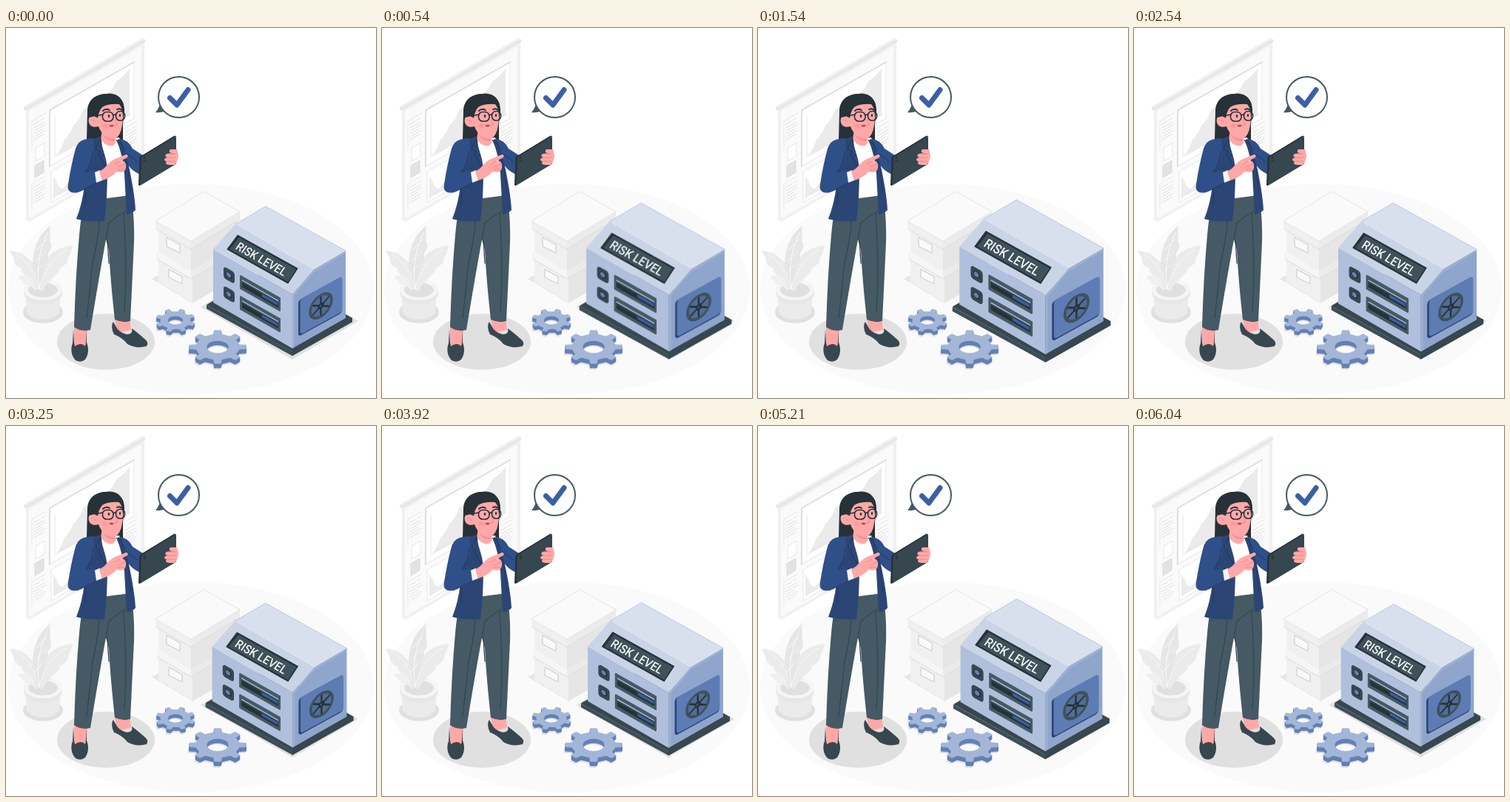
These frames come from a looping animation (500x500 px, 6.08 s). An HTML page:

```html
<!DOCTYPE html>
<html lang="en">
<head>
<meta charset="utf-8">
<title>Risk level</title>
<style>
  html, body { margin: 0; width: 100%; height: 100%; overflow: hidden; background: #fff; }
  svg { display: block; width: 100vw; height: 100vh; }
  #vault { transform-origin: 369.5px 342px; animation: pulse 6080ms linear infinite; }
  @keyframes pulse {
    0%, 60%, 100% { transform: scale(1); }
    20%, 80% { transform: scale(1.1); }
  }
  .label { font: 500 12.6px Roboto, Arial, sans-serif; fill: #f5f5f5; text-anchor: middle; }
  .line { fill: none; stroke-linecap: round; stroke-linejoin: round; }
  .skin { fill: #ffa8a7; }
  .dark { fill: #263238; }
  .shoe { fill: #37474f; }
  .jacket { fill: #2b4675; }
  .sleeve { fill: #2f4f88; }
  .fold { stroke: #22365f; stroke-width: 1; }
  .crease { stroke: #344750; stroke-width: 1.3; }
  .tint { stroke: #ea8583; stroke-width: .9; }
</style>
</head>
<body>
<svg viewBox="0 0 500 500">
  <defs>
    <g id="slot">
      <path fill="#455a64" stroke="#455a64" stroke-width="2" stroke-linejoin="round" d="M317 335L370 365V382L317 352Z"/>
      <path fill="#a3b4d5" d="M319 340L368 368V370L319 342Z"/>
      <path class="dark" d="M319 342L368 370V378L319 350Z"/>
      <path fill="#3a60a4" d="M346 359L367 371V375L346 363Z"/>
      <path fill="#37474f" d="M319 342L368 370V372L319 344Z"/>
    </g>
    <g id="knob">
      <rect x="-7.500" y="-8" width="15" height="16" rx="4" fill="#37474f"/>
      <circle r="4.200" fill="#263238"/>
      <circle cx="-.5" r="3" fill="#6180b6"/>
    </g>
    <g id="note" class="line" stroke="#e0e0e0" stroke-width="1">
      <path d="M0 4L19 -7M0 4V38" stroke="#e6e6e6"/>
      <path d="M3 8L10 4M13 2L17 0M3 13L16 5.5M3 17L18 8.5M3 21L14 14.5M3 25L18 16.5M3 29L16 21.5"/>
    </g>
  </defs>

  <ellipse cx="250" cy="353" rx="247" ry="142.500" fill="#fafafa"/>

  <g id="board">
    <path fill="#f0f0f0" d="M27 108L187 17V171L31 262L27 259Z"/>
    <path fill="#fafafa" d="M31 112L183 25V170L31 258Z"/>
    <path class="line" stroke="#e6e6e6" stroke-width="6" d="M27 108L185 17"/>
    <path class="line" stroke="#f0f0f0" stroke-width="3" d="M27 106L185 15"/>
    <path fill="#fff" stroke="#e6e6e6" d="M59 111L173 46V122L59 187Z"/>
    <path class="line" stroke="#dedede" stroke-width="2" d="M59 187V111L173 46"/>
    <path fill="#ebebeb" d="M68 173Q75 163 79 151Q86 145 91 132Q99 126 104 111L121 99Q142 91 149 72Q157 68 167 55V118Z"/>
    <path class="line" stroke="#e6e6e6" d="M66 120V174L168 116"/>
    <use href="#note" x="35" y="122"/>
    <use href="#note" x="35" y="207"/>
    <use href="#note" x="158" y="133"/>
    <path fill="#fff" stroke="#e6e6e6" d="M40 162L52 155V173L40 180Z"/>
    <path fill="#e3e3e3" stroke="#d9d9d9" d="M39 186L51 179V195L39 202Z"/>
    <path fill="#fff" stroke="#e6e6e6" d="M61 194L98 173V215L61 236Z"/>
    <path fill="#ebebeb" d="M64 230V201Q68 205 71 214Q77 221 82 211Q89 205 96 202V212Z"/>
  </g>

  <g id="plant">
    <ellipse cx="50" cy="384" rx="27" ry="15" fill="#e0e0e0"/>
    <path fill="#ebebeb" d="M26 357H74L72 385Q63 394 50 394Q36 394 28 385Z"/>
    <path fill="#e6e6e6" d="M24 353V360Q29 373 50 374Q71 373 76 360V353Z"/>
    <ellipse cx="50" cy="354" rx="26" ry="14" fill="#f5f5f5"/>
    <ellipse cx="50" cy="354" rx="20" ry="10" fill="#e0e0e0"/>
    <path fill="#ebebeb" d="M46 355C45 322 54 297 91 294C87 301 88 306 84 310C85 316 79 322 73 324C73 333 58 337 50 356Z"/>
    <path fill="#ebebeb" d="M44 353C46 332 38 304 5 301C8 307 11 311 11 316C13 322 18 324 21 325C20 331 28 336 35 339Z"/>
    <path fill="#e6e6e6" d="M42 353C32 324 33 288 60 267C58 275 61 281 59 288C64 295 59 302 56 306C60 313 54 319 51 324C54 331 48 340 47 354Z"/>
    <path fill="#f0f0f0" d="M41 353C38 338 29 331 16 336C19 340 23 342 24 347C30 346 37 350 40 356Z"/>
    <path class="line" stroke="#fafafa" d="M45 353Q38 312 56 277M45 353Q53 316 82 300M43 353Q39 320 13 305M40 316L54 301M39 333L49 320M41 300L55 286"/>
  </g>

  <g id="cartons">
    <path fill="#e6e6e6" d="M197 339L252 372L318 334L262 304Z"/>
    <path fill="#f0f0f0" d="M206 309L252 335V371L206 344Z"/>
    <path fill="#e6e6e6" d="M252 335L312 300V337L252 371Z"/>
    <path fill="#f5f5f5" d="M203 301L250 328V338L203 311Z"/>
    <path fill="#ebebeb" d="M250 328L316 290V300L250 338Z"/>
    <path fill="#f0f0f0" d="M206 269L250 295V328L206 302Z"/>
    <path fill="#e6e6e6" d="M250 295L312 259V293L250 328Z"/>
    <path fill="#f0f0f0" d="M202 261L250 288V298L202 271Z"/>
    <path fill="#ebebeb" d="M250 288L316 248V258L250 298Z"/>
    <path fill="#fafafa" stroke="#e6e6e6" stroke-linejoin="round" d="M202 261L267 221L316 248L250 288Z"/>
    <path class="line" stroke="#dedede" d="M203 272L250 299L316 259M204 312L250 339L280 322"/>
    <g fill="#fafafa" stroke="#c7c7c7" stroke-linejoin="round">
      <path d="M217 283L235 293V304L217 295Z"/>
      <path d="M220 326L238 336V346L220 337Z"/>
    </g>
  </g>

  <g id="gears"></g>

  <path fill="#e0e0e0" d="M263 377L387 448L476 396L354 326Z"/>

  <g id="vault">
    <g stroke-linejoin="round">
      <path fill="#37474f" stroke="#37474f" d="M272 374L387 437L467 392L352 328Z"/>
      <path fill="#3c4d56" stroke="#3c4d56" d="M271.500 375L387 438V442.500L271.500 379Z"/>
      <path fill="#37474f" stroke="#37474f" d="M387 437L467.500 392V397L387 442.500Z"/>
    </g>
    <path fill="#b0bfdb" d="M280 299L387 360V433L280 371Z"/>
    <path fill="#8fa5cc" d="M387 360L416 326L459 301V392L387 433Z"/>
    <path fill="#9db0d2" d="M387 360L416 326L459 301V304L416 330L390 361V431L387 433Z"/>
    <path fill="#c9d4e7" d="M280 299L310 265L416 326L387 360Z"/>
    <path fill="#d9e0ed" d="M310 265L351 241L459 301L416 326Z"/>
    <path class="line" stroke="#b0bfdb" stroke-width=".8" d="M310 265L351 241L459 301"/>

    <path fill="#263238" stroke="#263238" stroke-linejoin="round" d="M313 280L394 325L381 345L299 299Z"/>
    <path fill="#3f525b" d="M315 283L392 326L381 343L302 299Z"/>
    <text class="label" transform="matrix(1 .565 -.74 1.060 342 317)">RISK LEVEL</text>

    <use href="#knob" transform="matrix(1 .565 0 1 301.500 334)"/>
    <use href="#knob" transform="matrix(1 .565 0 1 301.500 360)"/>
    <use href="#slot"/>
    <use href="#slot" y="28"/>

    <g transform="matrix(1 -.55 0 1 425.500 375.500)">
      <rect x="-30.500" y="-24" width="59" height="49" rx="4" fill="#2b4675"/>
      <rect x="-28" y="-24.500" width="57" height="48" rx="4" fill="#5c7cb3"/>
      <circle r="15" fill="#526b98"/>
      <path class="line" stroke="#263238" stroke-width="2.200" d="M0 -14V14M-12 -7L12 7M-12 7L12 -7"/>
      <circle r="14.500" fill="none" stroke="#3f525b" stroke-width="3.500"/>
      <circle r="4" fill="#263238"/>
      <circle cx="-.5" r="1.500" fill="#455a64"/>
    </g>
  </g>

  <g id="bubble">
    <path fill="#455a64" d="M202 114Q206 110 208 102L215 112Q209 115 202 114Z"/>
    <circle cx="233.500" cy="93.500" r="27.500" fill="#fff" stroke="#455a64" stroke-width="2"/>
    <path class="line" stroke="#3a60a4" stroke-width="7" d="M221.500 94.500L231 104L246 83.500"/>
  </g>

  <g id="woman">
    <ellipse cx="135" cy="424" rx="66" ry="38" fill="#e0e0e0"/>
    <path class="dark" d="M109 152L110 113C110 95 124 88 138 89C152 89 160 98 160 112L158 130V152L126 160Z"/>

    <path class="skin" d="M92 402H110L109 434L92 432ZM146 390L167 391L169 408L151 412Z"/>
    <path class="shoe" d="M90 426C87 433 88 443 94 449Q101 453 107 448C112 441 112 432 109 425L109 408L108 425Q102 422 92 426L91 407Z"/>
    <path class="shoe" d="M145 397C142 401 143 408 146 414Q157 418 164 427Q176 434 190 430Q194 425 186 419Q177 411 170 406Q172 414 163 414Q152 411 149 404Z"/>
    <path class="skin" d="M92 425Q102 421 108 425L107 430Q102 424 93 430Z"/>
    <path fill="#455a64" d="M106 234L168 226Q174 250 173 290L168 396Q158 399 147 394Q141 340 139 300L135 286Q126 335 114 408Q101 411 92 404Q94 335 99 280Q101 255 106 234Z"/>
    <path class="line crease" d="M135 286L139 264Q153 252 163 247M126 245Q128 270 117 318L109 392M139 318L137 286M159 250Q164 320 160 384M108 238Q105 253 105 262"/>

    <path fill="#fff" d="M129 150L153 148Q164 185 162 225Q150 230 134 227Z"/>
    <path class="skin" d="M130 138L148 145L149 152Q147 161 139 159Q132 157 128 150Z"/>
    <path class="sleeve" d="M154 150Q165 151 171 163L185 172L181 198Q170 193 165 185Z"/>
    <path class="jacket" d="M149 151L156 151L165 182Q174 224 175 246Q170 251 163 252L160 197Q158 171 149 151Z"/>
    <path class="jacket" d="M128 147C128 160 136 173 137 191Q137 231 133 261Q113 263 95 258Q103 238 106 213L108 175L117 150Z"/>
    <path class="sleeve" d="M118 149C104 150 98 152 94 163Q88 185 84 211C82 221 88 224 98 222L123 209L121 193L108 195L120 172Z"/>
    <path class="line fold" d="M108 195Q116 181 118 166M128 149L121 164L127 167L125 171L137 191M152 150L160 164L157 168L163 183M108 220L107 239M164 183L169 225M101 220L121 210M163 170L178 181"/>
    <path fill="#f5f5f5" d="M120 195L127 192L130 206L122 209Z"/>
    <path class="skin" d="M126 194Q133 190 138 184Q143 178 150 176L162 171Q166 171 164 175L154 180Q160 178 162 184Q163 191 159 194Q155 196 150 194Q141 203 130 206Z"/>
    <path class="line tint" d="M154 180L147 184M161 184L151 188M159 191L151 191"/>

    <path fill="#263238" stroke="#263238" stroke-width="3" stroke-linejoin="round" d="M182 175L228 147V183L180.500 211.500Z"/>
    <path fill="#37474f" stroke="#37474f" stroke-width="2" stroke-linejoin="round" d="M184 175.500L229 147.500V183L182.500 211Z"/>
    <circle cx="187" cy="179" r="1.200" class="dark"/>
    <circle cx="187" cy="175.500" r="1.200" class="dark"/>
    <path class="skin" d="M231 164L222 164Q219 167 223 169L228 169L217 170Q213 173 218 175L215 176Q212 179 217 180L216 182Q216 185 221 185L228 185Q233 180 233 171Z"/>
    <path class="line tint" d="M219 170L229 170M217 175.500L229 175M217 180.500L228 180"/>

    <path class="skin" d="M121 109C126 98 146 95 155 104Q160 119 157 131Q155 146 147 150C138 151 129 144 125 133Q115 136 112 128C110 119 117 116 122 121Z"/>
    <path class="dark" d="M112 121C109 105 118 91 134 89Q153 86 159 103L160 113Q156 108 153 103Q138 102 130 107Q125 113 124 122L121 119Z"/>
    <path class="line tint" d="M115 125Q117 122 121 127M147 124L151 130L147 131"/>
    <path class="line" stroke="#263238" stroke-width="1.900" d="M131 112Q135 108 140 111M150 110Q154 108 157 111"/>
    <g class="line" stroke="#263238" stroke-width="1.600">
      <rect x="130.500" y="113.500" width="14.500" height="12.500" rx="5.500"/>
      <rect x="148.500" y="112.500" width="12" height="12.500" rx="5.500"/>
      <path d="M145 118Q147 116 148.500 118M130.500 117L121 119"/>
    </g>
    <ellipse cx="139" cy="119" rx="1.300" ry="2" class="dark"/>
    <ellipse cx="154" cy="118" rx="1.200" ry="2" class="dark"/>
    <ellipse cx="134" cy="132" rx="4" ry="3" fill="#ff9a99"/>
    <path fill="#b44c55" d="M139 132Q143 129 146 132Q143 135 139 132Z"/>
    <path fill="#f28f8f" d="M131 144Q138 151 147 150L146 153Q136 153 131 144Z"/>
  </g>
</svg>
<script>
  const gears = document.getElementById('gears');

  function add(name, attrs) {
    const el = document.createElementNS('http://www.w3.org/2000/svg', name);
    for (const key in attrs) el.setAttribute(key, attrs[key]);
    gears.append(el);
  }

  const ellipse = (x, y, r, flat) =>
    `M${x - r} ${y}a${r} ${r * flat} 0 1 0 ${2 * r} 0a${r} ${r * flat} 0 1 0 ${-2 * r} 0Z`;

  function gearPath(x, y, r, hole, turn) {
    const flat = 0.58, teeth = 8, points = [];
    for (let i = 0; i < teeth; i++) {
      for (const [offset, radius] of [[-.23, .77], [-.15, 1], [.15, 1], [.23, .77]]) {
        const a = (i + offset) / teeth * 2 * Math.PI + turn;
        points.push(`${x + r * radius * Math.cos(a)} ${y + r * radius * flat * Math.sin(a)}`);
      }
    }
    return `M${points.join('L')}Z${ellipse(x, y, hole, flat)}`;
  }

  // Stacked copies give the gear its thickness.
  function gear(x, y, r, hole, depth, turn) {
    const layer = (dy, fill) => add('path', {
      d: gearPath(x, y + dy, r, hole, turn), fill, stroke: fill,
      'stroke-width': .8, 'stroke-linejoin': 'round', 'fill-rule': 'evenodd'
    });
    add('path', {
      d: gearPath(x - 1, y + depth + 2, r + 1, hole, turn), fill: '#e0e0e0', 'fill-rule': 'evenodd'
    });
    for (let dy = depth; dy > 0; dy--) layer(dy, '#6481b5');
    layer(0, '#a3b6d8');
  }

  gear(229, 395, 26.5, 10.5, 5, .36);
  gear(286, 431, 38.5, 15, 6, 0);
</script>
</body>
</html>
```
